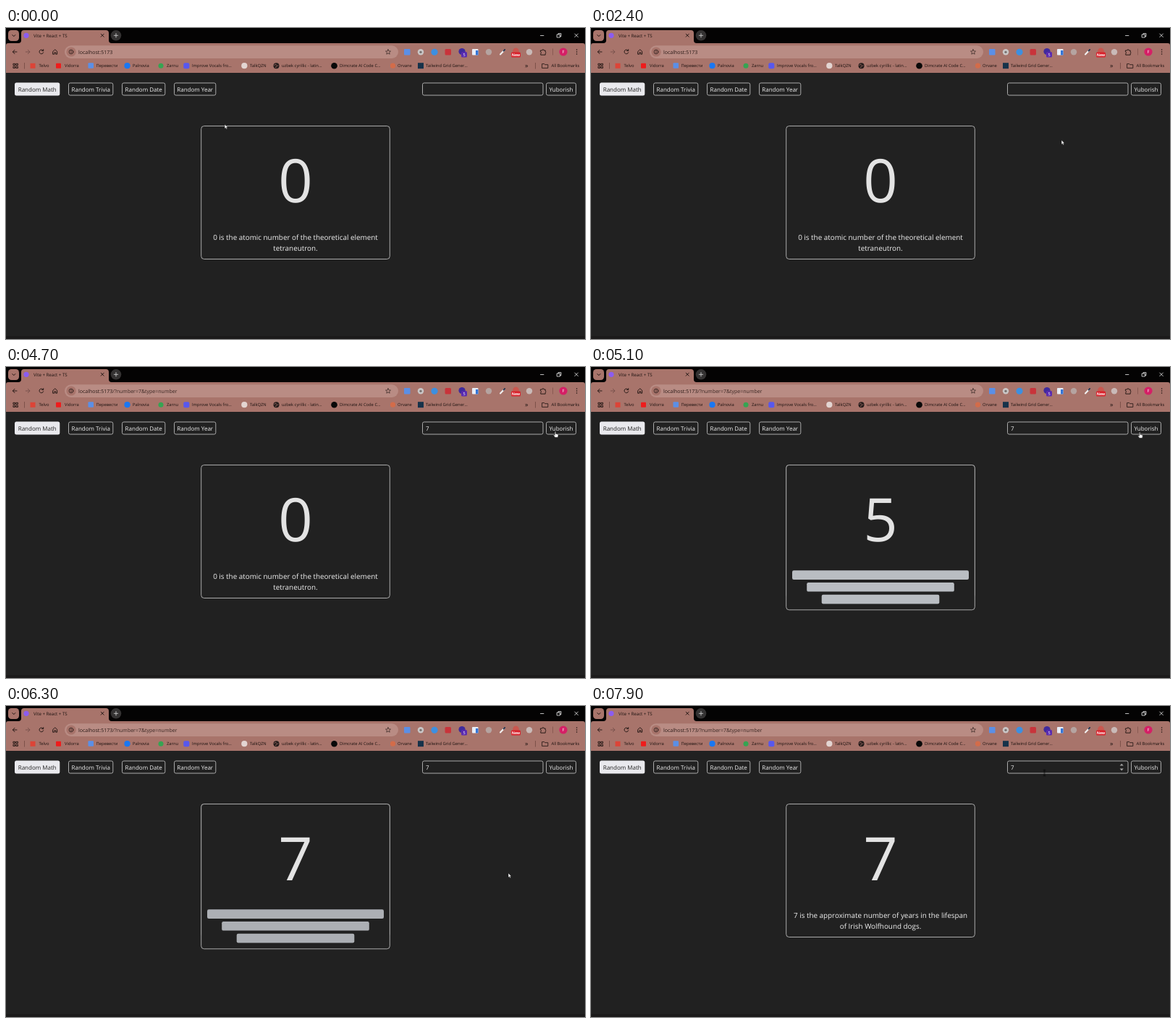
An HTML page that plays this animation: 800 px wide and 430 px high, repeating every 8000 ms.

```html
<!DOCTYPE html>
<html lang="en">
<head>
<meta charset="utf-8">
<title>Number facts</title>
<style>
html, body { margin: 0; width: 100%; height: 100%; overflow: hidden; background: #212121; }
svg { display: block; }
text { font-family: "Open Sans", "Noto Sans", sans-serif; text-rendering: geometricPrecision; white-space: pre; }
.mid { text-anchor: middle; }
.line { fill: none; stroke-linecap: round; stroke-linejoin: round; }
.ink { stroke: #1c1210; }
.marks text { font-size: 5.8px; fill: #1c1210; }
.page text { font-size: 8px; fill: #f0f0f0; }
.page .fact text { font-size: 9.87px; }
.page .digits { font-size: 83px; fill: #e3e3e3; }
.box { fill: #212121; stroke: #aaa; }

/* one 8 s timeline shared by every part */
.cursor, .reel, .on { animation: 8s step-end infinite; }
.cursor { animation-name: move; animation-timing-function: linear; }
.reel { animation-name: count; }
.arrow { animation-name: arrow; }
.beam { animation-name: beam; }
.hand { animation-name: hand; }
.query { animation-name: query; }
.focus { animation-name: focus; }
.spin { animation-name: spin; }
.typed { animation-name: typed; }
.first { animation-name: first; }
.load { animation-name: load; }
.second { animation-name: second; }
.pulse { animation: pulse 2s cubic-bezier(.4, 0, .6, 1) -1.25s infinite; }

@keyframes move {
  0% { transform: translate(302px, 133px); }
  4% { transform: translate(340px, 142px); }
  11% { transform: translate(600px, 180px); }
  15% { transform: translate(659.5px, 197.5px); }
  18.75% { transform: translate(652px, 348px); }
  22.5% { transform: translate(656px, 275px); }
  30% { transform: translate(650px, 155px); }
  35.6% { transform: translate(642px, 92px); }
  38%, 49.4% { transform: translate(640.5px, 87.5px); }
  55% { transform: translate(757px, 89px); }
  58.75%, 63.5% { transform: translate(759px, 89px); }
  68.75% { transform: translate(743px, 109px); }
  78.75% { transform: translate(694px, 231px); }
  87% { transform: translate(684px, 224px); }
  96.25% { transform: translate(628px, 102px); }
  98.75%, 100% { transform: translate(626.5px, 92.5px); }
}
@keyframes count {
  0% { transform: translateY(0); }
  60.14% { transform: translateY(-100px); }
  60.75% { transform: translateY(-200px); }
  61.46% { transform: translateY(-300px); }
  62.37% { transform: translateY(-400px); }
  63.59% { transform: translateY(-500px); }
  65.44% { transform: translateY(-600px); }
  69.38%, 100% { transform: translateY(-700px); }
}
@keyframes arrow { 0%, 64.5% { opacity: 1; } 35.6%, 98.25%, 100% { opacity: 0; } }
@keyframes beam { 0%, 54.4% { opacity: 0; } 35.6%, 98.25%, 100% { opacity: 1; } }
@keyframes hand { 0%, 64.5%, 100% { opacity: 0; } 54.4% { opacity: 1; } }
@keyframes query { 0% { opacity: 0; } 58.1%, 100% { opacity: 1; } }
@keyframes focus { 0%, 58.1%, 100% { opacity: 0; } 38.1% { opacity: 1; } }
@keyframes spin { 0%, 58.1% { opacity: 0; } 35.6%, 98.25%, 100% { opacity: 1; } }
@keyframes typed { 0% { opacity: 0; } 48.1%, 100% { opacity: 1; } }
@keyframes first { 0% { opacity: 1; } 59.6%, 100% { opacity: 0; } }
@keyframes load { 0%, 84.9%, 100% { opacity: 0; } 59.6% { opacity: 1; } }
@keyframes second { 0% { opacity: 0; } 84.9%, 100% { opacity: 1; } }
@keyframes pulse { 50% { opacity: .5; } }
</style>
</head>
<body>
<svg width="800" height="430" viewBox="0 0 800 430">
  <rect width="800" height="430" fill="#212121"/>
  <rect y="426" width="800" height="4" fill="#1b1a1a"/>

  <!-- tab strip -->
  <rect width="800" height="24" fill="#040303"/>
  <path d="M0 62V24Q0 21 3 21H17Q21 21 21 17V7Q21 3 25 3H138Q142 3 142 7V17Q142 21 146 21H797Q800 21 800 24V62Z" fill="#a8746b"/>
  <rect x="3" y="3" width="15" height="15" rx="4.5" fill="#a8746b"/>
  <path class="line ink" d="M8.8 9.6l2 2 2-2"/>
  <circle cx="28" cy="10.3" r="3.6" fill="#8c5cf0"/>
  <text x="38" y="12.7" font-size="6.15" fill="#1c1210">Vite + React + TS</text>
  <path class="line ink" d="M131.2 8.2l4 4m0-4l-4 4" stroke-width=".9"/>
  <circle cx="152" cy="10.3" r="7.3" fill="#343232"/>
  <path class="line" stroke="#ddd" stroke-width=".8" d="M149.3 10.3h5.4m-2.7-2.7v5.4"/>
  <g class="line" stroke="#eee" stroke-width=".8">
    <path d="M738.5 10.5h4.4M785.8 8l4.6 4.6m0-4.6l-4.6 4.6"/>
    <path d="M761.5 9h4v4h-4zM763 9V7.6h4v4h-1.4"/>
  </g>

  <!-- toolbar -->
  <rect x="81" y="24.3" width="461" height="17.6" rx="8.8" fill="#b98c84"/>
  <circle cx="90" cy="33" r="6.6" fill="#a8746b"/>
  <g class="line ink" stroke-width=".9">
    <path d="M15 33H9.4m2.6-2.7L9.3 33l2.7 2.7"/>
    <path d="M27.3 33h5.6m-2.6-2.7L33 33l-2.7 2.7" stroke="#74504a"/>
    <path d="M51.3 31.2a2.9 2.9 0 1 0 .4 2.6M51.7 29.6v2h-2"/>
    <path d="M65 32.3l2.8-2.5 2.8 2.5v3.9h-1.9v-2.4h-1.8v2.4H65z"/>
    <circle cx="90" cy="33" r="2.9" stroke-width=".7"/>
    <path d="M90 32.8v1.5M90 31.4v.1" stroke-width=".8"/>
    <path d="M528 29.6l1 2.3 2.5.2-1.9 1.7.6 2.4-2.2-1.3-2.2 1.3.6-2.4-1.9-1.7 2.5-.2z" stroke-width=".6"/>
  </g>
  <g font-size="7">
    <text x="100" y="35.6" fill="#2a1a17">localhost:5173<tspan class="on query" fill="#3a2723">/?number=7&amp;type=number</tspan></text>
  </g>

  <!-- extensions -->
  <rect x="550" y="29" width="8.5" height="8.5" rx="1" fill="#5b8fe6"/>
  <circle cx="573" cy="33.3" r="4.2" fill="#c9c6c6"/>
  <circle cx="573" cy="33.3" r="1.6" fill="#77716f"/>
  <circle cx="592" cy="33.3" r="4.6" fill="#3d8fe0"/>
  <rect x="606.5" y="29" width="8.5" height="8.5" rx="1.5" fill="#c8343b"/>
  <circle cx="630" cy="32.5" r="4.6" fill="#3f2a9c"/>
  <rect x="629" y="33" width="8" height="7.5" rx="1.5" fill="#5a2bb0"/>
  <text class="mid" x="633" y="39" font-size="5.5" fill="#fff">5</text>
  <rect x="644" y="29" width="8.5" height="8.5" rx="1" fill="#e8eef8"/>
  <rect x="649" y="31" width="3.5" height="6.5" fill="#3476d8"/>
  <circle cx="667" cy="33.3" r="4.2" fill="#b5a4a1"/>
  <path class="line" d="M683 36.5l5.5-5.8" stroke="#f2f2f2" stroke-width="2"/>
  <path class="line" d="M687.6 31.6l1.5-1.6" stroke="#26334d" stroke-width="2"/>
  <circle cx="704.5" cy="32" r="4.4" fill="#c9574f"/>
  <rect x="698" y="33.4" width="13" height="7" rx="1.5" fill="#d8202a"/>
  <text class="mid" x="704.5" y="39" font-size="5.2" font-weight="700" fill="#fff">New</text>
  <circle cx="723" cy="33.3" r="4.2" fill="#c9bab8"/>
  <path class="line ink" stroke-width=".9" d="M738.8 31h2a1.2 1.2 0 0 1 2.4 0h2v2a1.2 1.2 0 0 1 0 2.2v2h-6.4v-2a1.2 1.2 0 0 0 0-2.2z"/>
  <path d="M755.5 28.5v9" stroke="#8a5a52"/>
  <circle cx="770" cy="33" r="5.6" fill="#d51f66"/>
  <text class="mid" x="770" y="35.2" font-size="5.8" fill="#fff">F</text>
  <g fill="#1c1210">
    <circle cx="788.6" cy="30" r=".8"/><circle cx="788.6" cy="33" r=".8"/><circle cx="788.6" cy="36" r=".8"/>
  </g>

  <!-- bookmarks -->
  <g class="marks">
    <path class="line ink" stroke-width=".9" d="M10.3 49.3h2.2v2.2h-2.2zm3.9 0h2.2v2.2h-2.2zm-3.9 3.9h2.2v2.2h-2.2zm3.9 0h2.2v2.2h-2.2z"/>
    <path d="M25.5 48v8.5M731.5 48v8.5" stroke="#7d514a"/>
    <rect x="33.5" y="48.8" width="7" height="7" fill="#dc4437"/>
    <text x="45.5" y="54.2">Telvo</text>
    <rect x="69" y="48.8" width="7" height="7" rx="1" fill="#ee1c1c"/>
    <text x="81" y="54.2">Vidorra</text>
    <rect x="113.5" y="48.3" width="7.5" height="7.5" rx="1" fill="#5b8fe6"/>
    <text x="124.5" y="54.2">Перевести</text>
    <circle cx="167.5" cy="52.2" r="4.1" fill="#1a77f2"/>
    <text x="175" y="54.2">Palnovia</text>
    <circle cx="214" cy="52.2" r="3.5" fill="#36a452"/>
    <text x="222" y="54.2">Zarnu</text>
    <rect x="245.3" y="48.2" width="8" height="8" rx="2" fill="#5858ee"/>
    <text x="257" y="54.2">Improve Vocals fro...</text>
    <circle cx="329.3" cy="52.2" r="4.1" fill="#e3d5d2"/>
    <text x="337" y="54.2">TalkQZN</text>
    <circle cx="373.5" cy="52.2" r="4" fill="#241b1a"/>
    <path class="line" d="M370.8 51.2q2-2.2 3 .2t2 .4M372.3 54.4l1.6-.9" stroke="#a8746b" stroke-width=".9"/>
    <text x="381" y="54.2">uzbek cyrillic - latin...</text>
    <circle cx="453.5" cy="52.2" r="4.3" fill="#080808"/>
    <text x="461" y="54.2">Dimcrate AI Code C...</text>
    <circle cx="534.5" cy="52.2" r="3.6" fill="#d36c4a"/>
    <text x="541" y="54.2">Orvane</text>
    <rect x="569" y="48.2" width="8" height="8" fill="#16324a"/>
    <text x="580" y="54.2">Tailwind Grid Gener...</text>
    <text x="717" y="54.6" style="font-size:9px">»</text>
    <path class="line ink" stroke-width=".8" d="M741 49.6h2.8l1 1.1h4v4.7H741z"/>
    <text x="753.5" y="54.2">All Bookmarks</text>
  </g>

  <!-- page -->
  <g class="page">
    <rect x="12" y="75.5" width="62.3" height="18" rx="2.5" fill="#e9e9ed"/>
    <rect class="box" x="86.5" y="76" width="61.3" height="17" rx="2.2"/>
    <rect class="box" x="160.5" y="76" width="59.3" height="17" rx="2.2"/>
    <rect class="box" x="232.5" y="76" width="57.3" height="17" rx="2.2"/>
    <rect class="box" x="575.5" y="76" width="166.5" height="17" rx="2.2"/>
    <rect class="box" x="746.5" y="76" width="41" height="17" rx="2.2"/>
    <g class="mid">
      <text x="43.2" y="87.6" style="fill:#212121">Random Math</text>
      <text x="117.2" y="87.6">Random Trivia</text>
      <text x="190.2" y="87.6">Random Date</text>
      <text x="261.2" y="87.6">Random Year</text>
      <text x="767" y="87.6">Yuborish</text>
    </g>
    <rect class="on focus" x="575.7" y="76.1" width="166.2" height="16.8" rx="2.2" fill="none" stroke="#fff" stroke-width="1.5"/>
    <g class="on spin">
      <path d="M730.6 82.6l2.6-2.8 2.6 2.8zM730.6 86.6l2.6 2.8 2.6-2.8z" fill="#a5a5a5"/>
    </g>
    <text class="on typed" x="580" y="87.6">7</text>

    <rect class="box" x="269.7" y="135.5" width="260.6" height="184" rx="4"/>
    <g class="on load">
      <rect class="box" x="269.7" y="135.5" width="260.6" height="200.3" rx="4"/>
      <g class="pulse" fill="#d1d5db">
        <rect x="278" y="281.3" width="244" height="12.6" rx="2.2"/>
        <rect x="298.2" y="298" width="203.6" height="12.6" rx="2.2"/>
        <rect x="318.7" y="314.8" width="162.6" height="12.6" rx="2.2"/>
      </g>
    </g>
    <svg x="360" y="160" width="80" height="100" overflow="hidden">
      <g class="reel">
        <text class="digits mid" x="40 40 40 40 40 40 40 40" y="81.3 181.3 281.3 381.3 481.3 581.3 681.3 781.3">01234567</text>
      </g>
    </svg>
    <g class="fact mid">
      <g class="on first">
        <text x="400" y="293">0 is the atomic number of the theoretical element</text>
        <text x="400" y="307.6">tetraneutron.</text>
      </g>
      <g class="on second">
        <text x="400" y="293">7 is the approximate number of years in the lifespan</text>
        <text x="400" y="307.6">of Irish Wolfhound dogs.</text>
      </g>
    </g>
  </g>

  <g class="cursor">
    <path class="on arrow" d="M0 0V6.2L1.5 4.9 2.5 7.1 3.6 6.6 2.6 4.5H4.5Z" fill="#fff" stroke="#0a0a0a" stroke-width=".5"/>
    <path class="on beam line" d="M-1.2-3.8h2.4M0-3.8v7.6M-1.2 3.8h2.4" stroke="#050505" stroke-width=".8"/>
    <path class="on hand" d="M-.7.6Q0-.5.7.6V3.3L3.4 4Q4.2 4.3 4.1 5.2L3.6 8.3H-.6L-2.5 5.3Q-2.2 4.3-1.3 4.9L-.7 5.4Z" fill="#fff" stroke="#0a0a0a" stroke-width=".5"/>
  </g>
</svg>
</body>
</html>
```
